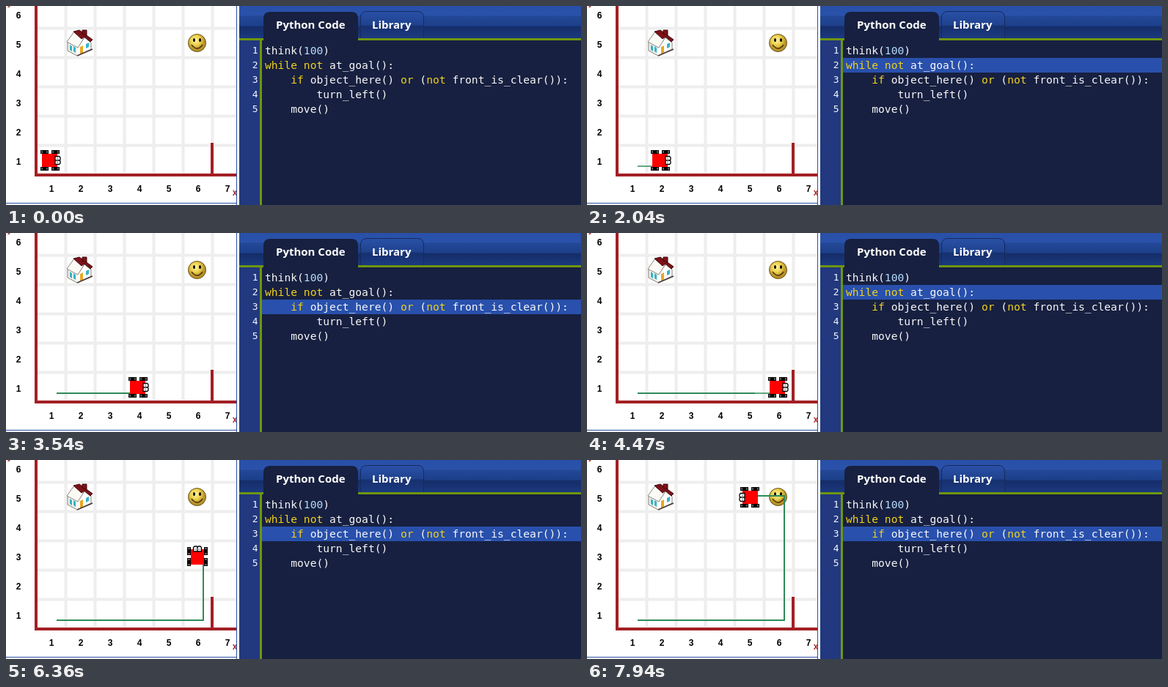
An HTML page for the animation above (8000 ms loop, 784x272 px).

```html
<!DOCTYPE html>
<html lang="en">
<meta charset="utf-8">
<title>Robot world</title>
<style>
  html, body { margin: 0; width: 100%; height: 100%; overflow: hidden; background: #fff; }
  svg { display: block; }
  text { white-space: pre; }
  .label { font: bold 12px "Liberation Sans", Arial, sans-serif; text-anchor: middle; }
  .axis { fill: #a52a2a; }
  .tab { font: bold 15px "Open Sans", sans-serif; fill: #fff; }
  .code { font: 14.64px "DejaVu Sans Mono", monospace; fill: #f8f8f8; }
  .num { font: 13px "DejaVu Sans Mono", monospace; fill: #f4f6fa; text-anchor: end; }
  .key { fill: #f2d21c; }
  .lit { fill: #b4d8fa; }
</style>
<svg width="784" height="272" viewBox="0 0 784 272">
  <defs>
    <linearGradient id="bar" x2="0" y2="1">
      <stop stop-color="#2850a8"/><stop offset=".28" stop-color="#2a52aa"/>
      <stop offset=".31" stop-color="#234897"/><stop offset=".6" stop-color="#1d3f8a"/>
      <stop offset=".63" stop-color="#152d68"/><stop offset="1" stop-color="#1b3a80"/>
    </linearGradient>
    <linearGradient id="idle" x2="0" y2="1">
      <stop stop-color="#2a51a8"/><stop offset=".5" stop-color="#1f428e"/>
      <stop offset=".55" stop-color="#17316f"/><stop offset="1" stop-color="#1b3a80"/>
    </linearGradient>
    <radialGradient id="face" cx=".42" cy=".35">
      <stop stop-color="#fff3a0"/><stop offset=".55" stop-color="#ecd04e"/><stop offset="1" stop-color="#b8922a"/>
    </radialGradient>
    <clipPath id="view"><path d="M0 0H314V269H0Z"/></clipPath>
  </defs>

  <g clip-path="url(#view)">
    <path id="grid" stroke="#eee" stroke-width="4"/>
    <path d="M41 0V231H314M281 189V231" fill="none" stroke="#a31f24" stroke-width="4" stroke-linecap="square"/>
    <g id="labels"></g>
    <text class="label axis" x="5" y="-1">y</text>
    <text class="label axis" x="312" y="259">x</text>

    <g id="house">
      <path d="M84 50L97 57V68L84 61Z" fill="#f4f2ea"/>
      <path d="M97 57L107 43L116 50V59L97 68Z" fill="#fff"/>
      <path d="M97 57L107 43L116 50V59L97 68L84 61V50" fill="none" stroke="#86807a"/>
      <path d="M83 49L93 35L108 41L98 57Z" fill="#fbfaf5" stroke="#8c8680"/>
      <path d="M92 35L100 33L118 46L115 49L107 42L103 45Z" fill="#7c1218" stroke="#40090d"/>
      <path d="M104 33H110V40L104 38Z" fill="#7c1218" stroke="#40090d"/>
      <path d="M87 53L90 55V62L87 60ZM92 55L95 57V64L92 62Z" fill="#35b3c8"/>
      <path d="M101 56L105 54V64L101 66Z" fill="#e8a822"/>
      <path d="M109 52L113 50V56L109 58Z" fill="#35b3c8"/>
      <path d="M97 68L118 59" stroke="#4a3a38" stroke-width="1.5"/>
    </g>

    <circle cx="260.5" cy="50.5" r="12" fill="url(#face)" stroke="#65501a"/>
    <ellipse cx="256.500" cy="46.500" rx="1.500" ry="2.500"/>
    <ellipse cx="264.500" cy="46.500" rx="1.500" ry="2.500"/>
    <path d="M253 53Q260.500 63 268 53" fill="none" stroke="#4a3508" stroke-width="1.500"/>

    <g fill="none" stroke="#2e8b57" stroke-width="2">
      <path id="trail"/><path id="fresh" opacity=".75"/>
    </g>

    <g id="robot">
      <path d="M-14-14H-3V-9H-14ZM1-14H12V-9H1ZM-14 9H-3V14H-14ZM1 9H12V14H1Z"/>
      <path d="M-12-13V-10M-5-13V-10M3-13V-10M10-13V-10M-12 10V13M-5 10V13M3 10V13M10 10V13" stroke="#bbb"/>
      <path d="M-9-10V10M6-10V10" stroke="#000" stroke-width="2"/>
      <path d="M-12-9H9V9H-12Z" fill="red"/>
      <path d="M6-5.500H11.500L13-4V-1L11.500 0H6ZM6 0H11.500L13 1V4L11.500 5.500H6Z" fill="#fff" stroke="#000" stroke-width="1.300"/>
      <path d="M9-5V5" stroke="#888"/>
    </g>
  </g>
  <path d="M314.500 0V272M0 269.500H314" stroke="#2850a0"/>

  <path d="M318 0H784V45H318Z" fill="url(#bar)"/>
  <path d="M318 47H347V272H318Z" fill="#22387f"/>
  <path d="M349 47H784V272H349Z" fill="#172040"/>
  <path d="M318 45.500H784M347.500 45V272" stroke="#6f960f" stroke-width="3"/>
  <path d="M351 48V17Q351 8 360 8H471Q480 8 480 17V48Z" fill="#172040"/>
  <path d="M483.500 44V16Q483.500 7.500 492 7.500H561Q569.500 7.500 569.500 16V44" fill="url(#idle)" stroke="#162a5c"/>
  <text class="tab" x="368" y="31">Python Code</text>
  <text class="tab" x="499" y="31">Library</text>
  <rect id="mark" x="349" width="435" height="20" fill="#2850ac"/>
  <g id="code"></g>
</svg>
<script>
const $ = id => document.getElementById(id);
const LOOP = 8000, LAG = 30, FRESH = 340;

const source = `think(100)
while not at_goal():
    if object_here() or (not front_is_clear()):
        turn_left()
    move()`;

// [time, executed line]
const steps = [
  [730, 1], [1050, 2], [1550, 3], [1780, 5], [2010, 2], [2210, 3], [2410, 5],
  [2600, 2], [2790, 3], [2990, 5], [3210, 2], [3390, 3], [3590, 5], [3830, 2],
  [3990, 3], [4210, 5], [4410, 2], [4600, 3], [4960, 4], [5190, 5], [5280, 2],
  [5440, 3], [5660, 5], [5900, 2], [6160, 3], [6400, 5], [6660, 2], [6910, 3],
  [7110, 5], [7210, 2], [7330, 3], [7460, 4], [7600, 5], [7740, 2], [7880, 3]
];
// Pen position relative to the robot for east, north and west
const pen = [[8, 8], [8, -2], [8, -2]];
const heading = [[1, 0], [0, 1], [-1, 0]];
const center = (x, y) => [21 + 40 * x, 251 - 40 * y];

function build() {
  let grid = '', labels = '';
  for (let i = 0; i < 6; i++) grid += `M${81.5 + 40 * i} 0V229M43 ${30.5 + 40 * i}H314`;
  for (let i = 1; i < 8; i++) {
    labels += `<text class="label" x="${22 + 40 * i}" y="254">${i}</text>`;
    if (i < 7) labels += `<text class="label" x="17" y="${257 - 40 * i}">${i}</text>`;
  }
  $('grid').setAttribute('d', grid);
  $('labels').innerHTML = labels;
  $('code').innerHTML = source.split('\n').map((line, i) => {
    const y = 66 + 20 * i;
    const text = line.replace(/\b(while|not|if|or)\b|\d+/g,
      (s, key) => `<tspan class="${key ? 'key' : 'lit'}">${s}</tspan>`);
    return `<text class="num" x="343.500" y="${y - 1}">${i + 1}</text><text class="code" x="353" y="${y}">${text}</text>`;
  }).join('');
}

function draw(t) {
  let x = 1, y = 1, dir = 0, line = 0, moved = -LOOP;
  const points = [[69, 219]];
  for (const [at, n] of steps) {
    if (t < at) break;
    line = n;
    if (t < at + LAG) break;
    if (n === 4) dir++;
    if (n === 5) {
      x += heading[dir][0];
      y += heading[dir][1];
      const [cx, cy] = center(x, y);
      points.push([cx + pen[dir][0], cy + pen[dir][1]]);
      moved = at;
    }
  }
  const path = list => list.length > 1 ? 'M' + list.join('L') : '';
  const isFresh = t - moved < FRESH;
  $('trail').setAttribute('d', path(isFresh ? points.slice(0, -1) : points));
  $('fresh').setAttribute('d', isFresh ? path(points.slice(-2)) : '');
  $('robot').setAttribute('transform', `translate(${center(x, y)}) rotate(${-90 * dir})`);
  $('mark').setAttribute('y', 31 + 20 * line);
  $('mark').setAttribute('visibility', line ? 'visible' : 'hidden');
}

build();
const start = performance.now();
function tick() {
  draw((performance.now() - start) % LOOP);
  requestAnimationFrame(tick);
}
tick();
</script>
</html>
```
